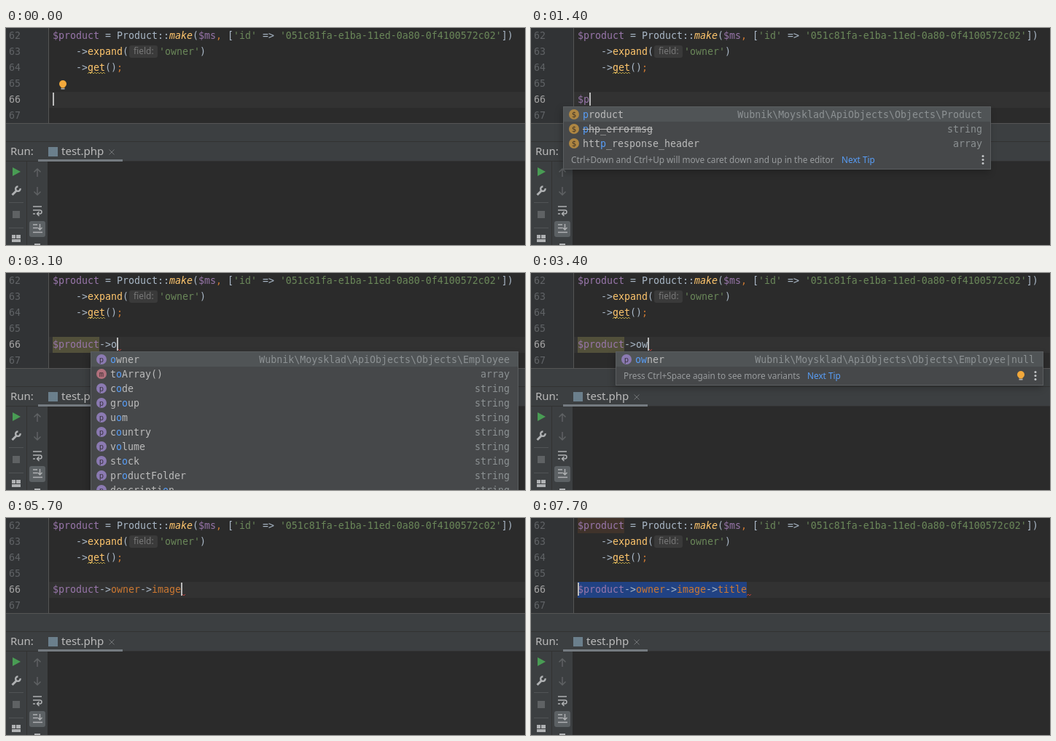
An HTML page for the animation above (8000 ms loop, 712 px wide and 299 px high).

```html
<!DOCTYPE html>
<html lang="en">
<head>
<meta charset="utf-8">
<title>Editor completion</title>
<style>
  html, body { margin: 0; width: 100%; height: 100%; overflow: hidden; background: #2b2b2b; }
  svg { display: block; }
  text { white-space: pre; }
  .code { font: 13.29px "DejaVu Sans Mono", monospace; }
  .ui { font-family: "Noto Sans", "Open Sans", sans-serif; }
  .box { filter: drop-shadow(-2px 4px 5px rgba(0, 0, 0, .22)); }
</style>
</head>
<body>
<svg id="stage" width="712" height="299" viewBox="0 0 712 299">
  <g id="base"></g>
  <g id="live"></g>
</svg>
<script>
const CHAR = 8, LEFT = 64, ROW = 22, LOOP = 8000, POP_W = 587;
const C = {
  plain: "#a9b7c6", variable: "#9876aa", member: "#cc7832", string: "#6a8759",
  call: "#ffc66d", link: "#589df6", icon: "#afb1b3", off: "#5f6264", error: "#bc3f3c"
};

const esc = s => s.replace(/&/g, "&amp;").replace(/</g, "&lt;").replace(/>/g, "&gt;");
const rect = (x, y, w, h, fill, more = "") =>
  `<rect x="${x}" y="${y}" width="${w}" height="${h}" fill="${fill}" ${more}/>`;
const path = (d, stroke, w = 1.5, fill = "none") =>
  `<path d="${d}" stroke="${stroke}" stroke-width="${w}" fill="${fill}"/>`;
const ui = (x, y, s, size, fill) =>
  `<text class="ui" x="${x}" y="${y}" font-size="${size}" fill="${fill}">${esc(s)}</text>`;

// parts: [text, colour, extra attributes]
const code = (x, y, parts, more = "") =>
  `<text class="code" x="${x}" y="${y}" ${more}>` + parts.map(([s, fill, extra = ""]) =>
    `<tspan fill="${fill}" ${extra}>${esc(s)}</tspan>`).join("") + "</text>";

function wave(x, y, w, color) {
  let d = `M${x} ${y + 2}`;
  for (let i = 2; i <= w; i += 2) d += `L${x + i} ${y + (i % 4 ? 0 : 2)}`;
  return path(d, color, 1);
}

const bulb = (x, y) =>
  `<circle cx="${x}" cy="${y - 1}" r="5" fill="#f2a83b"/>` +
  rect(x - 2.5, y + 3, 5, 1.5, "#f2a83b") + rect(x - 2.5, y + 5, 5, 1.5, C.icon);

function editor() {
  const numbers = [62, 63, 64, 65, 66, 67].map((n, i) =>
    code(4, 15 + i * ROW, [[String(n), n === 66 ? "#a4a3a3" : "#606366"]])).join("");
  return rect(0, 0, 712, 131, "#2b2b2b") + rect(0, 0, 58, 131, "#313335") +
    rect(58, 88, 654, ROW, "#323232") + rect(58, 0, 1, 131, "#555") + numbers;
}

function sourceLines() {
  return code(LEFT, 15, [
      ["$product", C.variable], [" = Product::", C.plain],
      ["make", C.call, 'font-style="italic"'], ["(", C.plain], ["$ms", C.variable],
      [",", C.member], [" [", C.plain], ["'id'", C.string], [" => ", C.plain],
      ["'051c81fa-e1ba-11ed-0a80-0f4100572c02'", C.string], ["])", C.plain]]) +
    code(96, 37, [["->", C.plain], ["expand", C.call], ["(", C.plain]]) +
    rect(169, 24, 39, 17, "#3a3a3a", 'rx="3"') + ui(175, 36, "field:", 12, "#787878") +
    code(210, 37, [["'owner'", C.string], [")", C.plain]]) +
    code(96, 59, [["->", C.plain], ["get", C.call], ["()", C.plain], [";", C.member]]) +
    wave(112, 61, 24, "#b09a45");
}

function runPanel() {
  const tools =
    path("M9 192L20 198L9 204Z", "none", 0, "#499c54") +
    path("M8.500 230L15 223.500", C.icon, 3) +
    path("M19.500 221A3.200 3.200 0 1 1 16.500 218.500", C.icon, 2.4) +
    rect(4, 240, 20, 1, "#515456") + rect(9, 252, 10, 10, C.off) +
    rect(4, 275, 20, 1, "#515456") +
    rect(8, 285, 5, 5, C.icon) + rect(14, 285, 6, 5, C.icon) + rect(8, 291, 12, 4, C.icon);
  const output =
    path("M43 205V194M38.500 198.500L43 194L47.500 198.500", C.off) +
    path("M43 219V230M38.500 225.500L43 230L47.500 225.500", C.off) +
    path("M37 246H49M37 251H46.500A2.500 2.500 0 0 1 46.500 256H43M45.500 253L42.500 256L45.500 259M37 256H40", C.icon) +
    rect(32, 266, 22, 22, "#5c6164", 'rx="3"') +
    path("M37 271H43M37 275.500H43M37 281.500H50M46.500 270V278M43.500 275L46.500 278L49.500 275", C.icon) +
    rect(39, 297, 8, 2, C.icon);
  return rect(0, 131, 712, 168, "#3c3f41") + rect(0, 131, 712, 1, "#555") +
    rect(0, 156, 712, 1, "#323232") + rect(0, 183, 712, 1, "#323232") +
    rect(57, 184, 655, 115, "#2b2b2b") + rect(28, 184, 1, 115, "#323232") +
    ui(6, 175, "Run:", 15, "#bbb") + rect(58, 164, 13, 13, "#6b7f8c") +
    ui(76, 175, "test.php", 15, "#bbb") +
    path("M141.500 167.500L148.500 174.500M148.500 167.500L141.500 174.500", "#737678", 1) +
    rect(44, 181, 116, 3, "#747a80") + tools + output;
}

const KIND = { $: "#ae8642", p: "#8b7ab2", m: "#b1707c" };

function itemRow([kind, name, type, old], left, y, prefix) {
  const at = prefix ? name.indexOf(prefix) : -1;
  const end = at + prefix.length;
  const parts = at < 0 ? [[name, "#bbb"]] :
    [[name.slice(0, at), "#bbb"], [prefix, C.link], [name.slice(end), "#bbb"]];
  const strike = old ? rect(left + 27, y + 10, name.length * CHAR, 1, "#bbb") : "";
  return `<circle cx="${left + 15}" cy="${y + 10}" r="7" fill="${KIND[kind]}"/>` +
    `<text class="code" x="${left + 15}" y="${y + 13.5}" text-anchor="middle" ` +
    `style="font-size:10.5px" fill="#231f20" fill-opacity=".8">${kind}</text>` +
    code(left + 27, y + 15, parts) + strike +
    code(left + POP_W - 12, y + 15, [[type, "#8c9193"]], 'text-anchor="end"');
}

function popup({ left, items, prefix = "", hint, next, lamp }) {
  const right = left + POP_W, foot = 109 + items.length * 20;
  const h = items.length * 20 + (hint ? 26 : 1);
  let out = rect(left + .5, 108.5, POP_W - 1, h, "#46484a", 'stroke="#5a5d5f" class="box"') +
    rect(left + 1, 109, POP_W - 2, 20, "#505456");
  items.forEach((item, i) => out += itemRow(item, left, 109 + i * 20, prefix));
  if (!hint) return out;
  out += ui(left + 11, foot + 17, hint, 11.8, "#999c9e");
  if (next) out += ui(left + next, foot + 17, "Next Tip", 11.8, C.link);
  if (lamp) out += bulb(right - 31, foot + 12);
  for (const dy of [7.5, 12.5, 17.5])
    out += `<circle cx="${right - 11}" cy="${foot + dy}" r="1.5" fill="#c4c6c8"/>`;
  return out;
}

// Completion lists
const api = s => "Wubnik\\Moysklad\\ApiObjects\\" + s;
const obj = s => api("Objects\\" + s);
const helper = s => api("AutocompleteHelpers\\" + s);
const crud = obj("Traits\\CrudObjectTrait");
const text = name => ["p", name, "string"];

const product = ["$", "product", obj("Product")];
const phpError = ["$", "php_errormsg", "string", true];
const httpHeader = ["$", "http_response_header", "array"];
const globals = ["_GET", "_POST", "_COOKIE", "_FILES", "_SERVER", "argv"].map(n => ["$", n, "array"]);
const owner = ["p", "owner", obj("Employee")];
const common = [
  ["m", "get()", crud], ["m", "expand", obj("Traits\\ParamsObjectTrait")],
  text("name"), text("id"), ["m", "update(…", crud], ["m", "toArray()", "array"],
  ["m", "create()", crud], ["p", "meta", helper("MetaObjectType")]
];
const title = text("title"), updated = text("updated");
const tiny = ["p", "tiny", helper("TinyObject")];
const meta = ["p", "meta", helper("MetaObject")];
const mini = ["p", "miniature", helper("Miniature")];

const more = { hint: "Press Ctrl+Space again to see more variants", next: 263 };
const dot = { hint: "Press Ctrl+. to choose the selected (or first) suggestion and insert a dot afterwards" };
const lists = {
  vars: { left: 44, items: [product, ["$", "ms", "Wubnik\\Moysklad\\MoySklad"], phpError, httpHeader, ...globals] },
  p: { left: 44, prefix: "p", items: [product, phpError, httpHeader], next: 382,
    hint: "Ctrl+Down and Ctrl+Up will move caret down and up in the editor" },
  pr: { left: 44, prefix: "pr", items: [product], ...more },
  prLamp: { left: 44, prefix: "pr", items: [product], ...more, lamp: true },
  fields: { left: 116, items: [owner, ...common, text("code")] },
  o: { left: 116, prefix: "o", items: [owner, ["m", "toArray()", "array"],
    ...["code", "group", "uom", "country", "volume", "stock", "productFolder", "description"].map(text)] },
  ow: { left: 116, prefix: "ow", items: [["p", "owner", obj("Employee|null")]], ...more, lamp: true },
  person: { left: 172, items: [["p", "image", helper("Image|null")], owner, ...common] },
  image: { left: 228, items: [title, text("filename"), meta, mini, ["p", "size", "int"], tiny, updated], ...dot },
  t: { left: 228, prefix: "t", items: [title, tiny, meta, updated, mini], ...dot }
};

// [time, changes to the state]; hot = number of coloured members
const steps = [
  [0, { line: "", hot: 0, caret: true, lamp: true }],
  [400, { caret: false }],
  [1000, { line: "$", caret: true, lamp: false }],
  [1100, { list: "vars" }],
  [1300, { line: "$p" }],
  [1400, { list: "p" }],
  [1500, { line: "$pr" }],
  [1600, { list: "pr" }],
  [1800, { list: "prLamp" }],
  [2000, { line: "$product", list: null, mark: "#344134", def: true, wave: true }],
  [2300, { line: "$product-", mark: null, def: false }],
  [2400, { mark: "#52503a" }],
  [2700, { line: "$product->" }],
  [2800, { list: "fields" }],
  [3100, { line: "$product->o", list: "o" }],
  [3400, { line: "$product->ow", list: "ow" }],
  [3800, { line: "$product->owner", list: null }],
  [4100, { line: "$product->owner-", hot: 1 }],
  [4200, { mark: null }],
  [4400, { line: "$product->owner->" }],
  [4500, { list: "person" }],
  [5400, { line: "$product->owner->image", list: null }],
  [5700, { hot: 2 }],
  [6000, { line: "$product->owner->image-", hot: 1 }],
  [6100, { hot: 2 }],
  [6300, { line: "$product->owner->image->" }],
  [6400, { list: "image" }],
  [6600, { line: "$product->owner->image->t", list: "t" }],
  [7000, { line: "$product->owner->image->title", list: null }],
  [7300, { hot: 3 }],
  [7700, { selected: true, def: true }]
];
let carry = {};
const states = steps.map(([time, change]) => ({ ...(carry = { ...carry, ...change }), time }));

function typed(line, hot) {
  let n = 0;
  return line.split(/(->?)/).map(s => {
    if (s[0] === "$") return [s, C.variable];
    if (!s || s[0] === "-") return [s, C.plain];
    return [s, ++n <= hot ? C.member : C.plain];
  });
}

function scene(s) {
  const width = s.line.length * CHAR, end = LEFT + width;
  let out = "";
  if (s.def) out += rect(LEFT, 0, 64, 21, "#40332b");
  if (s.mark) out += rect(LEFT, 88, 64, ROW, s.mark);
  if (s.selected) out += rect(LEFT, 88, width, ROW, "#214283");
  out += sourceLines() + code(LEFT, 103, typed(s.line, s.hot));
  if (s.wave) out += wave(end, 105, 7, C.error);
  if (s.caret) out += rect(s.selected ? LEFT : end, 89, 2, 18, "#bbb");
  if (s.lamp) out += bulb(78, 78);
  if (s.list) out += popup(lists[s.list]);
  return out;
}

const live = document.getElementById("live");
document.getElementById("base").innerHTML = editor() + runPanel();
const start = performance.now();
let shown = null;

function tick() {
  const t = Math.max(0, performance.now() - start) % LOOP;
  const state = states.filter(s => s.time <= t).pop();
  if (state !== shown) {
    live.innerHTML = scene(state);
    shown = state;
  }
  requestAnimationFrame(tick);
}
tick();
</script>
</body>
</html>
```
